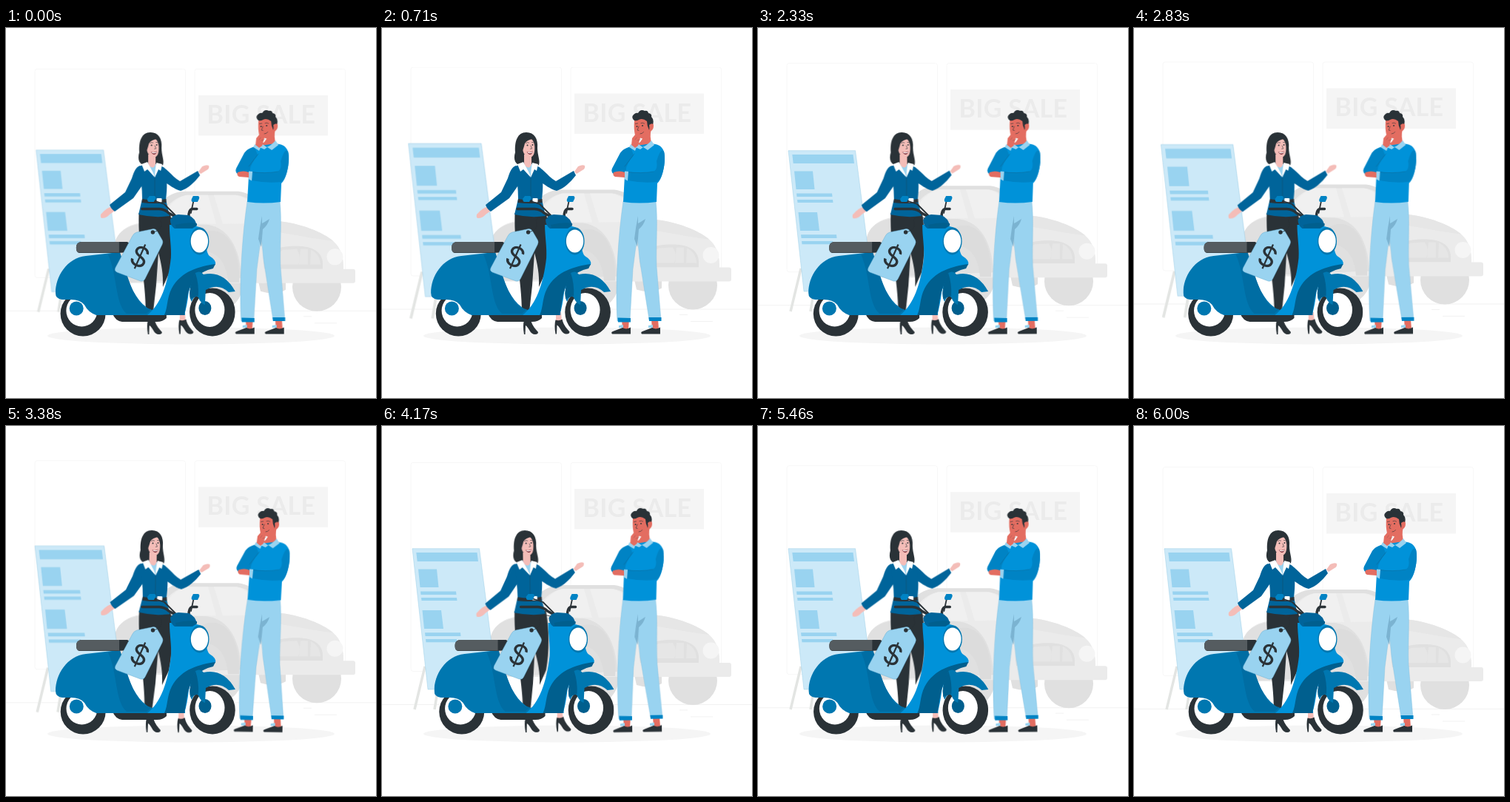
Recreate the animation shown at these times as an HTML page. Size 500 by 500 pixels, loop 6040 ms.

```html
<!DOCTYPE html>
<html lang="en">
<head>
<meta charset="utf-8">
<title>Scooter sale</title>
<style>
  html, body { margin: 0; width: 100%; height: 100%; overflow: hidden; background: #fff; }
  svg { display: block; width: 100%; height: 100%; }

  .float, .pulse, .sway, .shake { animation: 6.04s linear -.04s infinite; }
  .float { animation-name: float; }
  .pulse { animation-name: pulse; transform-origin: 102px 274.5px; }
  .sway { animation-name: sway; animation-duration: 1.51s; }
  .shake { animation-name: shake; animation-duration: 3.02s; }
  #seller { transform-origin: 201px 278px; }
  #buyer { transform-origin: 346px 263px; }

  @keyframes float { 50% { transform: translateY(-10px); } }
  @keyframes pulse {
    0%, 30%, 40%, 60%, 100% { transform: scale(1); }
    10%, 50% { transform: scale(1.1); }
  }
  @keyframes sway {
    0%, 100% { transform: rotate(0deg); }
    25% { transform: rotate(1deg); }
    75% { transform: rotate(-1deg); }
  }
  @keyframes shake {
    0%, 100% { transform: translateX(0); }
    10%, 90% { transform: translateX(-1px); }
    20%, 80% { transform: translateX(2px); }
    30%, 50%, 70% { transform: translateX(-4px); }
    40%, 60% { transform: translateX(4px); }
  }

  .blue { fill: #0092d9; }
  .mid { fill: #0083c4; }
  .deep { fill: #0077b0; }
  .navy { fill: #00649a; }
  .dusk { fill: #005f8e; }
  .sky { fill: #99d3f0; }
  .pale { fill: #cce9f8; }
  .ink { fill: #2a3237; }
  .white { fill: #fff; }
  .rose { fill: #f4bdb8; }
  .red { fill: #e36d61; }
  .g1 { fill: #f5f5f5; }
  .g2 { fill: #ebebeb; }
  .g3 { fill: #e0e0e0; }
  .line { fill: none; stroke: #2a3237; stroke-linecap: round; stroke-linejoin: round; }
  .sign { font: 700 34px Lato, sans-serif; letter-spacing: .3px; text-anchor: middle; }
  .price { font: 400 38px Inter, sans-serif; text-anchor: middle; }
</style>
</head>
<body>
<svg viewBox="0 0 500 500">

  <g class="float">
    <g fill="none" stroke="#f7f7f7">
      <rect x="39" y="55.5" width="203.500" height="282" rx="3"/>
      <rect x="255" y="55.5" width="203.500" height="282" rx="3"/>
    </g>
    <path d="M0 382.500H500M402 390h11M417 399h30" stroke="#efefef" stroke-width=".8"/>
    <rect class="g1" x="260" y="91" width="175" height="54.500"/>
    <text class="sign g2" x="345" y="129">BIG SALE</text>

    <!-- car -->
    <ellipse class="g3" cx="420" cy="350" rx="33" ry="33"/>
    <ellipse class="g3" cx="287" cy="346" rx="33" ry="36"/>
    <path class="g3" d="M340 338h38v16q-14 8-34 2z"/>
    <path class="g2" d="M146 300C146 276 165 264 192 262C206 240 222 224 240 222L312 222C336 224 352 242 366 261C398 264 428 276 442 288C453 297 457 312 456 328L346 345L146 345Z"/>
    <path class="g3" d="M186 264C203 236 222 221 242 221L314 221C338 224 356 246 368 262L359 264C346 244 332 229 312 226L244 226C226 229 212 245 202 264Z"/>
    <path fill="#f0f0f0" d="M206 264C216 244 230 228 245 226L273 226L284 265ZM281 226L310 226C328 229 344 248 354 264L293 265Z"/>
    <path class="g3" d="M146 300C146 276 165 264 196 264L272 266C300 270 316 296 318 338L146 345Z"/>
    <path fill="#dcdcdc" d="M255 290C266 268 292 270 304 290C313 306 316 324 315 344L300 344C298 316 284 296 255 304Z"/>
    <path fill="#e6e6e6" d="M366 261C398 264 428 276 442 288C414 285 388 279 366 276Z"/>
    <path class="g3" d="M348 318C350 302 366 295 392 295C414 295 427 302 428 318L428 326L349 326Z"/>
    <path fill="#e6e6e6" d="M374 300q-12 7-9 20h30q5-10-2-21zM398 299h10v21h-12zM412 300q12 5 13 20h-14z"/>
    <circle class="g1" cx="444.500" cy="309.500" r="11"/>
    <rect class="g2" x="344" y="326" width="128" height="19" rx="3"/>
  </g>

  <ellipse class="g1" cx="250" cy="416" rx="194" ry="11.500"/>

  <g class="pulse">
    <path d="M58 325L44 383M76 352L71 383" fill="none" stroke="#e3e5e3" stroke-width="3.500"/>
    <path class="pale" d="M41 165.700H131.600L156 356H62Z" stroke="#8cc4e0" stroke-width=".4"/>
    <path class="sky" d="M46.300 171H128.500L130 183H47.700ZM49 193.500H74L76.500 218H51.500ZM54.500 249H80L83 274H57Z"/>
    <path class="sky" d="M52 223.500H100L100.500 228H52.500ZM53 232H101L101.500 236H53.500ZM58 279.300H106L106.500 284H58.500ZM59 288H101L101.500 292.300H59.500Z"/>
  </g>

  <g id="seller" class="sway">
    <path class="rose" d="M193 384h7l1 13h-8zM235 384h7l1 13h-8z"/>
    <g id="heel">
      <path class="ink" d="M192 395Q197 397 201 394C203 403 208 407 211 411Q211 414 207 414Q202 414 199 408Q196 403 194 402L193.500 414H192Q190 402 192 395Z"/>
    </g>
    <use href="#heel" x="42.500" y="-.5"/>
    <path class="ink" d="M179.500 250L222 250C226 275 226 305 221 330L212 350C213 334 210 318 206 304L203 348L199 384L189 384C189 340 178 300 179.500 250Z"/>

    <path class="rose" d="M142 242C136 243 132 248 128 252Q127 257 130 257Q136 257 140 252L147 247ZM260 194L265 187Q271 184 274 186Q275 190 271 192L263 197Z"/>
    <path class="navy" d="M181 186C175 188 173 194 170 203L161 222L140 239Q142 245 147 248L172 230L188 207Z"/>
    <path class="navy" d="M207 186C217 188 222 199 235 207L259 193L262 199C255 208 246 217 236 220C227 218 220 211 213 208Z"/>
    <path class="ink" d="M189 186C180 185 177 178 180 168C179 153 183 141 195 141C206 141 211 150 210 162C210 172 214 179 212 185Q207 188 203 185Z"/>
    <path class="navy" d="M180 187L192 182L205 184L214 189C218 202 218 216 216 232L221 254Q200 257 179 252L184 231C184 216 182 202 180 187Z"/>
    <path class="sky" d="M190 184L205 184L201 201Z"/>
    <path class="rose" d="M192 171L202 170V184Q200 190 196 188Q192 186 192 182Z"/>
    <path class="white" d="M191 181L183 184L187 194L191 191L201 202C199 194 194 188 191 181ZM203 182L211 184L209 193L206 191L201 202C201 194 202 188 203 182Z"/>
    <path class="ink" d="M184 231Q200 234 216.500 231V236Q200 238 183.500 236Z"/>
    <rect class="white" x="203.500" y="230" width="7" height="5.500" rx="1"/>
    <path class="line" d="M201 203V231" stroke-width=".5" opacity=".5"/>

    <path class="rose" d="M190 157C190 152 195 149 202 150C206 154 207 160 206 167C205 174 201 176 196 174C191 171 189 164 190 157Z"/>
    <path class="ink" d="M189 152Q196 144 204 150Q196 151 193 156Q192 160 190 166Q186 160 189 152Z"/>
    <circle class="ink" cx="196.500" cy="158.500" r="1"/>
    <circle class="ink" cx="203.500" cy="158" r=".9"/>
    <path class="line" d="M194.500 155.500q2-1.500 4-.5M202.500 154.500l2 .3M201 159l1.500 4-2 .3" stroke-width=".6"/>
    <path d="M195.500 167Q199.500 169 203.500 166.500Q203 171 199.500 171Q197 170 195.500 167Z" fill="#7a2430"/>
    <path class="white" d="M196.500 167.500Q200 169 203 167.200V168.500Q200 170 197.500 169Z"/>
  </g>

  <g class="shake">
    <!-- wheels -->
    <circle class="ink" cx="104.200" cy="386" r="30.500"/>
    <ellipse class="white" cx="102.500" cy="382" rx="21" ry="21.500"/>
    <circle class="deep" cx="95.300" cy="379" r="9.500"/>
    <ellipse class="ink" cx="279" cy="384" rx="30.800" ry="32.500"/>
    <ellipse class="white" cx="275.500" cy="381" rx="20" ry="23"/>
    <ellipse class="dusk" cx="269" cy="378.500" rx="8.500" ry="9.500"/>
    <path class="ink" d="M144 386H217V392Q212 397 204 397H157Q148 396 144 386Z"/>

    <!-- mirrors and handlebar -->
    <path class="line" d="M199 233L214 238L229 253M250 250L253.500 234" stroke-width="1.800"/>
    <path class="line" d="M184 244.500H207Q215 245 220 250L229 255" stroke-width="3.400"/>
    <path class="line" d="M258 244.500H251Q247 246 247 255" stroke-width="3.400"/>
    <path class="mid" d="M194 227H201Q203 228 202 231L200 235H193Q191 234 191 231ZM253 227H260Q262 228 261 231L259 235H252Q250 234 251 231Z"/>

    <!-- rear body and footboard -->
    <path class="deep" d="M67 358C67 336 82 311 108 308L152 303C160 320 164 344 176 362Q184 375 196 381L220 378L242 376V388H122Q111 384 106 374Q100 367 88 367H76Q67 366 67 358Z"/>
    <path fill="#006da3" d="M138 306L154 303C161 322 166 350 181 371Q188 380 197 380L190 386H163C147 372 151 334 138 306Z"/>

    <!-- front shield -->
    <path class="blue" d="M221 266C240 266 257 266 266 271C273 282 268 300 275 308Q285 314 283 320C270 327 253 335 247 357Q245 375 241 388L191 388C209 374 219 346 223 311C224 296 221 282 221 266Z"/>
    <path class="dusk" d="M283 319C262 322 237 328 224 352C217 366 219 377 214 388L241 388C245 371 244 354 255 339Q265 328 280 325Z"/>
    <path class="deep" d="M256 331Q262 327 267 333Q294 327 310 356L301 357Q287 344 270 354L269 374Q263 372 260 364Q255 360 251 370Q244 358 256 331Z"/>
    <path class="dusk" d="M256 331Q246 350 249 366L260 362Q261 346 256 331Z"/>
    <path class="navy" d="M222 259Q225 253 233 252L247 253Q256 257 258 267L252 271H228Q222 267 222 259Z"/>
    <path class="dusk" d="M229 266Q245 262 258 264V267L252 270H230Z"/>
    <ellipse class="deep" cx="261.500" cy="288" rx="13" ry="18.500"/>
    <ellipse class="white" cx="261.500" cy="288" rx="11.700" ry="15.500"/>

    <!-- seat -->
    <path class="ink" d="M101 289H164Q171 291 168 303L150 304H99Q95 303 95 297Q95 290 101 289Z"/>
    <path d="M101 289H153V303.500H99Q95 303 95 297Q95 290 101 289Z" fill="#555c60"/>

    <!-- price tag -->
    <path class="sky" d="M171 281Q173 277 177 276L199 271.500Q202 271 204 274L211 286Q213 289 211 293L188 339Q186 343 182 342L150 330Q146 328 148 324Z" stroke="#6baed0" stroke-width=".5"/>
    <circle class="ink" cx="198.500" cy="276" r="2.700"/>
    <path class="line" d="M199 276C208 274 213 268 209 260Q211 253 224 257" stroke-width=".8"/>
    <text class="price ink" transform="translate(181 309) rotate(24)" y="13.500">$</text>
  </g>

  <g id="buyer" class="sway">
    <path class="red" d="M324 393h10l-1 14h-8zM364 393h9l1 14h-9z"/>
    <path class="ink" d="M325 405Q330 408 336 404.500L336 413.500H311Q309 411 312 410ZM365 405Q370 408 376 404.500V413.500H351Q349 411 352 410Z"/>
    <path class="sky" d="M320 402l6-1v4h-6zM360 402l6-1v4h-6z"/>
    <path class="sky" d="M326 234H370C373 258 370 292 371 322L377 394H361L348 312L345 280L339 326L335 396H318C315 348 319 282 326 234Z" stroke="#7dbbdc" stroke-width=".4"/>
    <path d="M346 254Q343 268 341 285L345 296L347 272Q354 266 356 258Q350 262 346 264Z" fill="#7bb3d1"/>
    <path class="mid" d="M318.500 391.500L336 392V397.500H319ZM360.500 391H377.500V396H361Z"/>

    <path class="red" d="M347 140L364 136Q361 148 365 157L354 165L345 158Z"/>
    <path class="blue" d="M344 159C333 160 326 163 322 169L311 190Q309 197 316 198L328 199L326 235Q348 238 371 235L372 210C380 203 384 178 381 167C378 158 371 157 364 156Z"/>
    <path class="mid" d="M332 206Q352 210 372 208C380 203 384 178 381 167Q377 160 371 180Q373 191 367 194Q349 197 332 194ZM322 169L311 190Q309 197 316 198L330 194Q328 187 340 172L336 161Q326 163 322 169Z"/>
    <path class="line" d="M331 194.500Q350 197 367 194M328 187L341 170" stroke-width=".5" opacity=".35"/>
    <path class="sky" d="M328 193.500L333 194L332 206.500L327.500 204ZM344 155L342 161L349 164L353 161L359 165L368 158L364 152Q358 159 352 161Z"/>
    <path class="sky" d="M336 157L344 161L342 166L334 161Z"/>
    <path class="red" d="M328 195Q321 192 313 195Q311 199 315 201L328 202Z"/>

    <path class="red" d="M341 125Q353 116 364 126Q368 128 366 134Q365 137 362 137Q362 147 353 151Q344 153 342 145Q340 136 341 125Z"/>
    <path class="ink" d="M341 125Q336 121 340 117Q343 114 346 115Q349 109 355 112Q359 111 360 115Q365 116 364 120Q368 124 366 130L363 130L361 138Q358 132 358 126Q352 121 347 124Q344 126 341 125Z"/>
    <path class="red" d="M361 131Q366 127 367 132Q367 138 362 140Z"/>
    <circle class="ink" cx="344.500" cy="133" r=".9"/>
    <circle class="ink" cx="352" cy="132" r=".9"/>
    <path class="line" d="M342.500 129.500l3-.5M350 128.500q2.500-1 4.500.5M347 133l-2 5 2 .5M349 143q3 0 4.500-2.500" stroke-width=".6"/>
    <path class="red" d="M337 158L338 149L343 143Q346 141 347 144L344 148L350 147Q352 149 349 151L346 159L342 162Z"/>
    <path class="white" d="M349 148.500l3 1-3 4.500-2 1.500z"/>
    <path class="line" d="M344 148l-2 3M350 150l-5 2" stroke-width=".5" opacity=".4"/>
  </g>
</svg>
</body>
</html>
```
